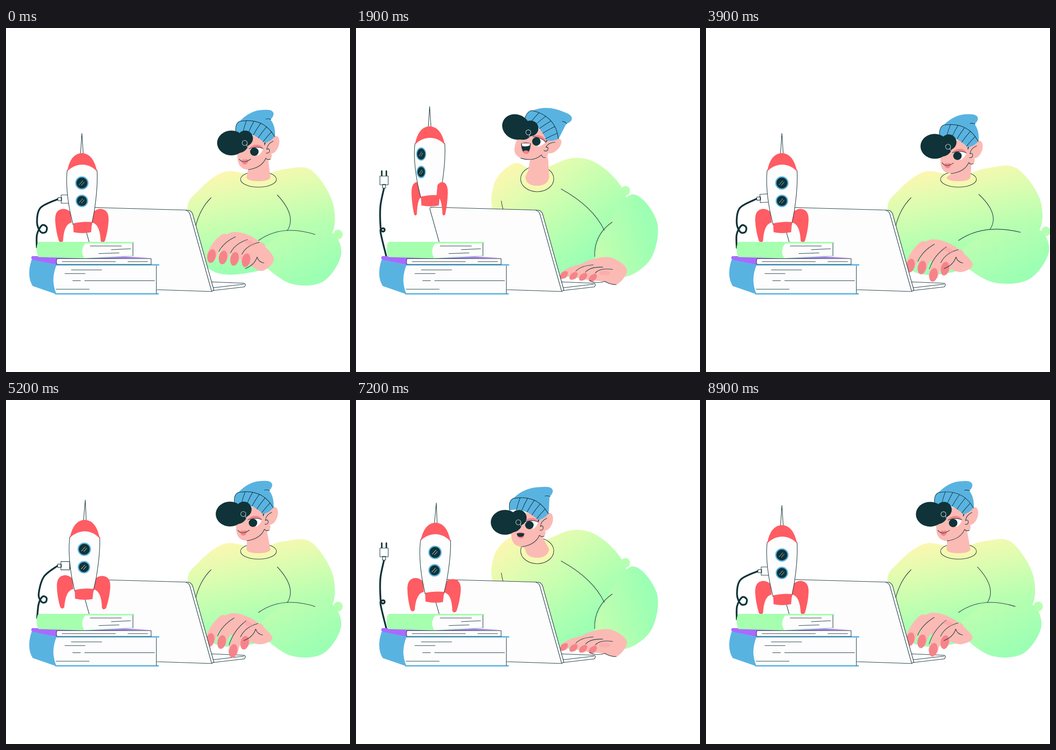
Write an HTML page with a canvas that moves like this. It is 748 px wide and 748 px high and loops after 9000 ms.

```html
<!DOCTYPE html>
<html lang="en">
<head>
<meta charset="utf-8">
<title>Rocket on the desk</title>
<style>
html, body { margin: 0; width: 100%; height: 100%; overflow: hidden; background: #fff; }
canvas { display: block; width: 100vw; height: 100vh; }
</style>
</head>
<body>
<canvas id="stage" width="748" height="748"></canvas>
<script>
const ctx = document.getElementById('stage').getContext('2d');
const CYCLE = 4500, STEP = 100, TAP = 467;
const INK = '#17363c', DARK = '#0f3338', SKIN = '#fcbab4', CORAL = '#f6838a', RED = '#ff5c63',
      BLUE = '#59b3e1', PAPER = '#fdfdfd', PURPLE = '#a66bff', MINT = '#a6ffae';

const lerp = (a, b, k) => a + (b - a) * k;
const mix = (a, b, k) => a.map((v, i) => lerp(v, b[i], k));
const clamp = v => Math.max(0, Math.min(1, v));
const ease = (t, a, b) => { const u = clamp((t - a) / (b - a)); return u * u * (3 - 2 * u); };
// Rises from a to b, stays, falls from c to d.
const pulse = (t, a, b, c, d) => ease(t, a, b) - ease(t, c, d);
const bezier = (a, c, b, u) => mix(mix(a, c, u), mix(c, b, u), u);

function paint(p, fill, stroke, w = 1.1) {
  if (fill) { ctx.fillStyle = fill; ctx.fill(p); }
  if (stroke) { ctx.strokeStyle = stroke; ctx.lineWidth = w; ctx.stroke(p); }
}
const path = (d, ...style) => paint(new Path2D(d), ...style);
const arc = ([x, y, cx, cy, ex, ey], color = INK, w) => path(`M${x} ${y} Q${cx} ${cy} ${ex} ${ey}`, null, color, w);
function oval(x, y, rx, ry, fill, rot = 0, stroke) {
  const p = new Path2D();
  p.ellipse(x, y, rx, ry, rot, 0, 2 * Math.PI);
  paint(p, fill, stroke);
}
// Smooth curve through a flat list of points
function spline(p, closed) {
  const n = p.length / 2, out = new Path2D();
  const at = i => {
    i = closed ? (i + n) % n : Math.max(0, Math.min(n - 1, i));
    return [p[2 * i], p[2 * i + 1]];
  };
  out.moveTo(p[0], p[1]);
  for (let i = 0; i < (closed ? n : n - 1); i++) {
    const [a, b, c, d] = [at(i - 1), at(i), at(i + 1), at(i + 2)];
    out.bezierCurveTo(b[0] + (c[0] - a[0]) / 6, b[1] + (c[1] - a[1]) / 6,
      c[0] - (d[0] - b[0]) / 6, c[1] - (d[1] - b[1]) / 6, ...c);
  }
  return out;
}
function group(draw) { ctx.save(); draw(); ctx.restore(); }
function shade(p, ...stops) {
  const g = ctx.createLinearGradient(...p);
  stops.forEach((c, i) => g.addColorStop(i / (stops.length - 1), c));
  return g;
}

// Upright and leaning key points
const TORSO = [
  [548,322, 478,312, 420,352, 395,400, 437,520, 540,530, 690,470, 713,390, 665,310, 605,307],
  [393,310, 345,294, 300,340, 310,420, 437,532, 540,530, 588,440, 585,360, 530,298, 470,283]];
const FOREARM = [
  [548,491, 610,446, 700,440, 729,490, 690,551, 620,556, 560,515],
  [519,497, 540,438, 600,362, 654,420, 642,500, 585,541, 545,510]];
const CHEST = [[590,363, 632,408, 612,440], [446,350, 515,388, 540,440]];
const SLEEVE = [[446,369, 422,392, 412,432], [316,376, 318,392, 325,410]];
const CUFF = [[548,491, 595,438, 657,440], [519,497, 517,450, 557,422]];
const CUFF_TYPING = [549,462, 600,426, 672,449];

function drawBody(s) {
  const { lean, arm, hx, hy } = s;
  // The elbow is pushed out sideways; the shoulders sink.
  const warp = p => p.map((v, i) => {
    const x = p[i & ~1], y = p[i | 1], k = s.push * clamp((x - 560) / 160);
    return i % 2 ? v - 4 * k + 8 * s.dip * clamp((480 - y) / 170) : v + 10 * k;
  });
  const pose = ([a, b], k) => warp(mix(a, b, k));
  const cloth = shade(mix([488,312, 530,525], [312,318, 470,525], lean),
    '#fbf7b0', '#e2fcb0', '#c9feb0', '#b1ffb1', '#9cffb3');
  const [nx, ny] = pose([[722,449], [586,354]], arm);
  oval(nx, ny, 10, 10.5, '#b6ffb1');
  paint(spline(pose(TORSO, lean), true), cloth);
  paint(spline(pose(FOREARM, arm), true),
    shade(mix([580,440, 640,560], [525,470, 640,445], arm), '#c2feb0', '#9cffb3'));
  arc(pose(CHEST, lean));
  arc(pose(SLEEVE, lean));
  arc(warp(mix(mix(...CUFF, arm), CUFF_TYPING, s.typing)));

  const cx = lerp(549, 394, lean), y = 329 - lean + 12 * s.dip, ry = lerp(17, 28, lean), low = y + ry - 13;
  oval(cx, y, lerp(39, 36, lean), ry, '#f3fab0', 0, INK);
  path(`M${530 + hx} ${285 + hy} L${527 + hx} ${306 + hy} L${cx - 26} ${y - 4} Q${cx - 24} ${low} ${cx} ${low}`
    + ` Q${cx + 23} ${low} ${cx + 26} ${y - 4} L${570 + hx} ${285 + hy} L${565 + hx} ${262 + hy}Z`, SKIN);
}

function drawMouth({ mouth, look }) {
  group(() => {
    ctx.translate(519 + 6 * mouth, 291);
    if (mouth < .1) {
      path('M-7 -2 Q-3 -8 0 -4 Q4 -8 8 -3 Q6 6 0 6 Q-5 6 -7 -2Z', CORAL);
      path('M-12 -6 Q-8 0 0 0 Q6 -1 13 -6', null, INK);
      return;
    }
    const h = 1 + 9 * mouth, w = 7 + 3 * mouth;
    ctx.rotate(-.42 * look);
    path(`M${-w - 1} ${-h} Q0 ${-h - 6} ${w + 1} ${-h} Q${w} ${h + 5} 0 ${h + 3} Q${-w} ${h + 3} ${-w - 1} ${-h}Z`, CORAL);
    path(`M${-w} ${-h} Q0 ${-h - 2} ${w} ${-h} Q${w} ${h} 0 ${h} Q${-w} ${h} ${-w} ${-h}Z`, DARK);
    if (mouth > .5) {
      path(`M${1 - w} ${-h} H${w - 1} L${w - 2} ${5 - h} Q0 ${8 - h} ${2 - w} ${6 - h}Z`, '#fff');
      oval(0, h - 2, 5, 2.5, CORAL);
    }
  });
}

function drawHat(slide) {
  const top = [[508,203], [560,194], [584,236]], rim = [[500,229], [533,222], [562,250]];
  const tip = x => x + 12 * slide;
  path(`M508 203 Q532 178 ${tip(560)} 178 Q${tip(581)} 176 ${tip(582)} 187 Q${tip(581)} 194 ${tip(575)} 199`
    + ' Q586 212 585 236 L562 250 Q533 222 500 229 Q497 208 508 203Z', BLUE);
  path('M584 236 Q576 247 562 250 L550 230Z', BLUE);
  path('M500 229 Q497 208 508 203 Q560 194 584 236', null, INK);
  path(`M${tip(565)} 198 Q${tip(571)} 196 ${tip(576)} 199`, null, INK);
  for (let u = .15; u < 1; u += .18) {
    const a = bezier(...top, u), b = bezier(...rim, u + .08);
    arc([...a, (a[0] + b[0]) / 2 - 1, (a[1] + b[1]) / 2, ...b]);
  }
}

function drawHead(s) {
  group(() => {
    ctx.translate(584 + s.hx, 255 + s.hy);
    ctx.rotate(.42 * s.look);
    ctx.translate(-584, -255);
    path('M505 255 Q500 286 508 299 Q516 311 538 307 Q564 298 572 265 L580 235 H515Z', SKIN);
    oval(582, 254, 11, 20, SKIN, .35);
    oval(570, 278, 8, 9, SKIN);
    path('M527 308 Q556 304 565 283 Q569 288 575 285', null, INK);
    path('M581 246 Q568 252 567 264 Q573 260 573 268 Q572 273 566 272', null, INK);
    path('M561 243 L566 246 L562 256Z', DARK);

    group(() => {
      ctx.translate(3 * s.lean, -8 * s.lean);
      path('M527 263 Q536 252 549 254 Q558 256 559 263 Q545 257 527 263Z', CORAL);
      path('M530 263 Q545 257 559 262 Q557 271 549 277 L536 276Z', '#fff');
      oval(540, 269, 9.3, 9, DARK);
      arc([529,263, 545,256, 559,262]);
      drawMouth(s);
    });
    drawHat(s.lean);

    group(() => {
      ctx.translate(0, 5 * s.lean * (1 - s.look));
      oval(490, 250, 31, 27, DARK);
      oval(520, 240, 17, 17, DARK);
      oval(508, 254, 20, 17, DARK, -.5);
      oval(519, 250, 5.5, 5.5, null, 0, '#c9d2d2');
      arc([524,252, 523,257, 526,259], '#c9d2d2');
    });
  });
}

// Typing and resting key points
const PALM = [
  [460,470, 492,444, 540,457, 582,500, 558,528, 528,514, 490,490],
  [470,531, 505,506, 553,499, 589,525, 568,557, 535,551, 490,545]];
const THUMB = ['M520 523 Q540 516 546 498 Q549 509 561 511', 'M508 549 Q522 557 541 551 Q553 558 566 558'];

function drawHand(s) {
  const rest = 1 - s.typing, drop = 20 * s.tap;
  group(() => {
    ctx.translate(-3 * s.tap, 0);
    const palm = mix(...PALM, rest).map((v, i) => i % 2 ? v + drop * clamp((535 - v) / 45) : v);
    paint(spline(palm, true), SKIN);
    for (let i = 0; i < 4; i++) {
      const reach = 12 * s.tap * (1 + Math.sin(2.2 * i - 2.6)) - 9 * s.lift;
      const x = lerp(447 + 25 * i, 452 + 21 * i, rest), y = lerp(496 + 3 * i, 537 + 2 * i, rest) + drop + reach;
      const mx = x + lerp(8, 15, rest), my = y - lerp(24, 13, rest) - reach / 2;
      const ex = lerp(475 + 26 * i, 497 + 21 * i, rest), ey = lerp(458 + 6 * i, 520 + 5 * i, rest) + drop;
      arc([x, y, mx, my, ex, ey], SKIN, lerp(21, 15, rest));
      oval(x, y, lerp(9, 6.5, rest), lerp(15, 10.5, rest), CORAL, lerp(.2, .85 + .25 * s.lift, rest));
      if (i) arc([x + lerp(-9, 5, rest), y - lerp(13, 10, rest), mx - 7 * s.typing, my - 9, ex - 2, ey - 10]);
    }
    oval(lerp(530, 541, rest), lerp(467, 533, rest) + drop, 12, 5, 'rgba(250,150,158,.35)', .4 * s.typing);
    path(THUMB[s.typing > .5 ? 0 : 1], null, INK);
  });
}

function drawBase() {
  path('M446 552 L518 555 Q523 558 518 563 L449 571Z M449 565 L517 557', PAPER, INK);
}
function drawScreen() {
  path('M163 389.5 L394 396 Q403 396 406 405 L452 570 L447 573 L327 569 L210 560 L181 466 L161 395 Q160 390 163 389.5Z', PAPER, INK);
  path('M391 396.5 Q398 398 400 405 L447 572', null, INK);
}

function drawBooks() {
  path('M104 516 H327 V577 H108Z', PAPER);
  path('M56 503 L110 515 Q96 548 110 579 L58 561 Q44 538 56 503Z', BLUE);
  path('M106 515 H332 M108 578 H331', null, BLUE, 3);
  path('M327 517 V577 M142 526 H208 M128 534 H172 M145 549.5 H162 M171 549.5 H323 M109 568 H181', null, INK);
  path('M57 496 H240 L316 500 L112 502 L110 515 L58 504 Q52 500 57 496Z', PURPLE);
  path('M111 501.5 H315.5 V514 H111 Q108 508 111 501.5Z', PAPER, INK);
  path('M122 508 H238 M265 508 H308', null, INK);
  path('M72 465 H279 V467.5 L276 468 V495 L280 496 L170 501 L70 498 Q64 482 68 470 Q69 466 72 465Z', MINT);
  path('M172 468.5 H276 V494.5 L170 500 Q160 485 172 468.5Z', PAPER);
  path('M276 468 V495 M183 474 H251 M229 482 L271 480 M202 490.5 L246 489', null, INK);
}

// Drawn around its axis, x = 0
function drawRocket(s) {
  const yaw = -.63 * s.spin;
  const fin = side => group(() => {
    ctx.scale(side * (1 - .33 * s.spin), 1);
    path('M25 400 Q36 390 48 395 Q59 400 58 419 Q57 440 50 463 Q45 469 41 463 Q39 426 22 423Z', RED);
  });
  const port = (y, r) => group(() => {
    ctx.translate(32 * Math.sin(yaw), y + .08 * s.ry);
    ctx.scale(Math.cos(1.2 * yaw), 1);
    oval(0, 0, r, r, BLUE);
    oval(0, 0, r - 2.7, r - 2.7, DARK);
    path('M-6 4 L2 -5 M-1 5 L5 -2', null, '#b9c6c8', 1);
  });
  group(() => {
    ctx.translate(165 + s.rx, 400 + s.ry);
    ctx.rotate(s.tilt);
    ctx.translate(0, -400);
    path('M-3 274 L0 229 L3 274', PAPER, INK);
    fin(-1);
    if (s.spin < .3) fin(1);
    path('M-32 310 Q-36 345 -26 398 L-19 428 H21 L27 398 Q35 345 33 310 Q15 290 0 290 Q-16 290 -32 310Z', PAPER, INK);
    path('M-32 312 Q-25 273 0 272 Q25 273 33 312 Q19 297 0 297 Q-19 298 -32 312Z', RED);
    path('M-19 425 Q1 420 22 422 L20 444 Q1 448 -18 444Z', RED);
    port(337, 14.5);
    port(376, 13.5);
    if (s.spin >= .3) fin(1);
  });
}

// Plug end, belly, loop centre, far end, loop radius
const CABLE = {
  slack: [113,372, 75,391, 81,437, 67,477, 8.5],
  taut: [111,339, 96,372, 84,428, 69,469, 4],
  hang: [61,348, 53,388, 59,439, 66,497, 3.5],
  swung: [43,375, 27,407, 48,459, 56,503, 6.5]
};

function drawCable(s) {
  const [x, y, bx, by, lx, ly, ex, ey, r] = mix(
    mix(CABLE.slack, CABLE.taut, clamp(-s.ry / 33)), mix(CABLE.hang, CABLE.swung, s.swing), s.loose);
  const pts = [x, y, bx, by, lx - 1.6 * r, ly - 1.7 * r];
  for (let a = 2.3; a > -2.3; a -= 1.4) pts.push(lx + r * Math.cos(a), ly + r * Math.sin(a));
  pts.push(lx - 1.6 * r, ly + 1.4 * r, ex, ey);
  paint(spline(pts), null, DARK, 3.8);
  group(() => {
    ctx.translate(x, y);
    ctx.rotate((.6 * s.swing - Math.PI / 2) * s.loose);
    path('M26 -5 H37 M26 5 H37', null, DARK, 3.2);
    path('M0 -3.5 H8 V3.5 H0Z M7 -9 H26 V9 H7Z', '#fff', INK);
  });
}

function pose(t) {
  const lean = pulse(t, 1000, 1700, 2750, 3300), arm = pulse(t, 1100, 1700, 2750, 3300);
  const dip = pulse(t, 1000, 1200, 1300, 1800), push = 1.7 * pulse(t, 3050, 3500, 3900, 4450);
  const look = pulse(t, 1350, 1900, 2150, 2650) + .64 * pulse(t, 2950, 3300, 3350, 4050);
  const typing = 1 - pulse(t, 950, 1150, 3400, 3800);
  const tap = typing * (1 - Math.cos(2 * Math.PI * t / TAP)) / 2;
  const spin = pulse(t, 1450, 1950, 2150, 2550);
  const sway = pulse(t, 0, 600, 1500, 1900) + 1.3 * pulse(t, 2400, 2650, 2700, 2900);
  return {
    lean, arm, dip, push, look, typing, tap, spin,
    hx: 14 * look - 166 * lean + 5 * push - 3 * tap,
    hy: 9 * dip + lean * (11 - 8 * look) + 7 * push - 2 * tap,
    mouth: .7 * pulse(t, 1600, 1850, 2200, 2550) + .3 * pulse(t, 1600, 1850, 2800, 3050),
    lift: pulse(t, 950, 1100, 1200, 1500),
    rx: 4 * sway - 5 * spin,
    ry: -60 * pulse(t, 150, 2100, 2250, 2800),
    tilt: .02 * sway,
    loose: pulse(t, 1280, 1400, 3550, 3950),
    swing: 1.8 * pulse(t, 1200, 1380, 1380, 1600) + 1.1 * pulse(t, 2750, 3450, 3600, 4000)
  };
}

function frame(now) {
  const s = pose(Math.floor(now / STEP) * STEP % CYCLE);
  ctx.fillStyle = '#fff';
  ctx.fillRect(0, 0, 748, 748);
  ctx.lineCap = ctx.lineJoin = 'round';
  drawBody(s);
  drawHead(s);
  drawBase();
  drawHand(s);
  drawScreen();
  drawCable(s);
  drawRocket(s);
  drawBooks();
}

const start = performance.now();
function loop() {
  frame(performance.now() - start);
  requestAnimationFrame(loop);
}
loop();
</script>
</body>
</html>
```
